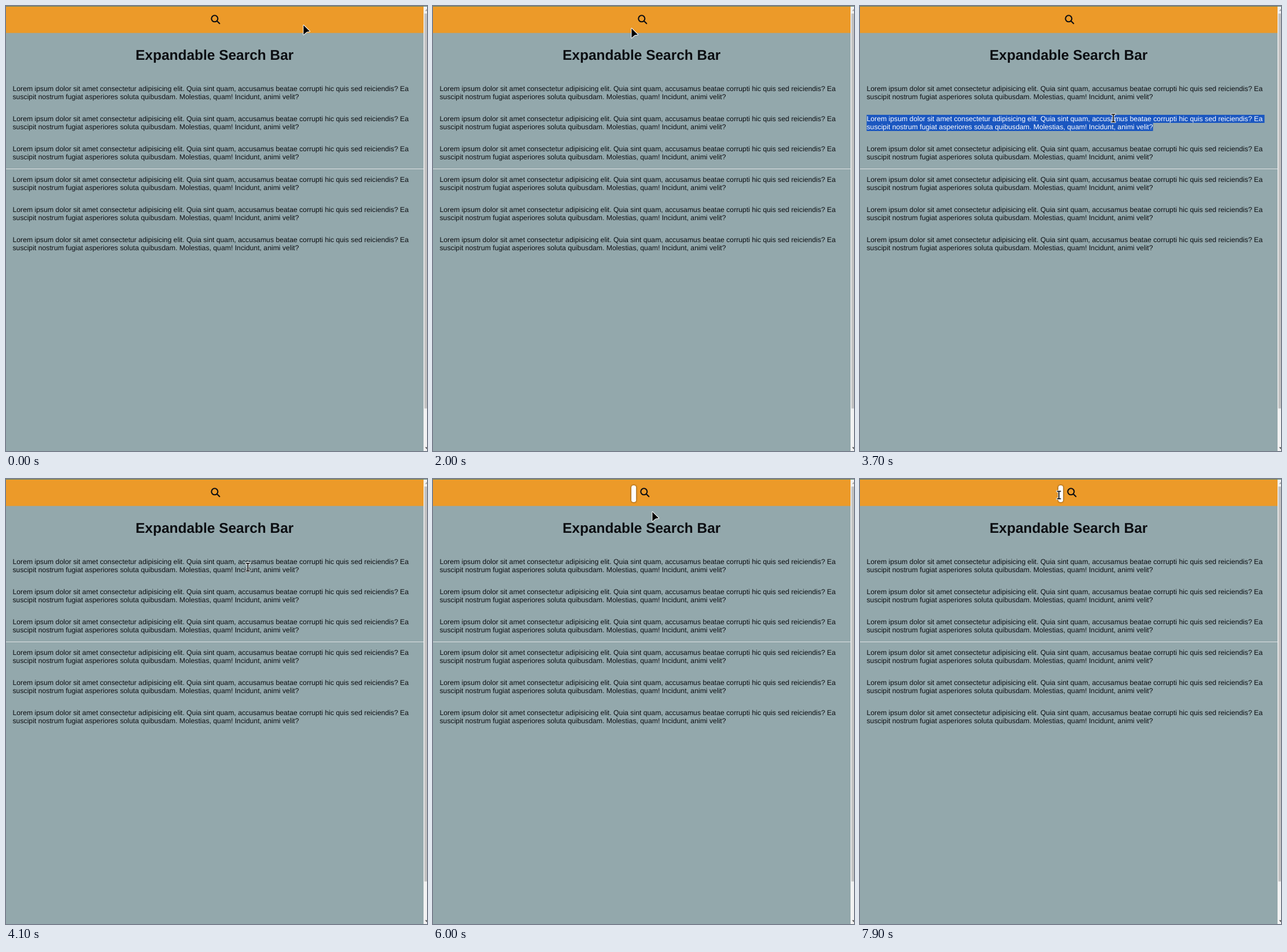
An HTML page for the animation above (8000 ms loop, 728 by 769 pixels).

```html
<!DOCTYPE html>
<html lang="en">
<head>
<meta charset="utf-8">
<title>Expandable Search Bar</title>
<style>
  html, body { margin: 0; width: 100%; height: 100%; overflow: hidden; background: #93a8ac; }
  svg { display: block; width: 728px; height: 769px; }
  text { font: 12.24px "Liberation Sans", Arial, sans-serif; fill: #0c0e12; text-rendering: geometricPrecision; }
  .title { font-size: 24.48px; font-weight: bold; }
  #field { filter: drop-shadow(.4px .8px 1.8px rgba(0, 0, 0, .75)); }
  .pointer path { paint-order: stroke; stroke: #fff; stroke-width: 2; stroke-linejoin: round; }
</style>
</head>
<body>
<svg viewBox="0 0 728 769">
  <rect width="728" height="769" fill="#93a8ac"/>
  <rect width="722" height="46.6" fill="#ec9a29"/>
  <rect y="281" width="722" height="1" fill="#dfe3e4"/>

  <g id="scrollbar">
    <rect x="722" width="6" height="769" fill="#f1f1f1"/>
    <rect x="723.5" y="13" width="4.5" height="682.5" fill="#c1c1c1"/>
    <path d="M724.5 8.5L728 5V8.5Z" fill="#a3a3a3"/>
    <path d="M724.5 762.5H728V766Z" fill="#505050"/>
  </g>
  <rect width="728" height="1" fill="#5c8474"/>

  <rect id="field" x="343" y="11" width="8.2" height="29" rx="3.8" fill="#fff"/>
  <g id="icon" fill="none" stroke-width="2.1" stroke-linecap="round">
    <circle cx="6.5" cy="6.5" r="5.5"/>
    <path d="M10.6 10.6L15 15"/>
  </g>

  <text class="title" x="360.7" y="93" text-anchor="middle">Expandable Search Bar</text>
  <g fill="#1b57c0">
    <rect id="word" x="401.3" y="188" width="61.9" height="14"/>
    <path id="block" d="M11.5 188H699.5V202H506.7V216H11.5Z"/>
  </g>
  <g id="copy"></g>

  <g class="pointer">
    <path id="arrow" d="M.5 1.2L11.2 11.8L6 12.7L.5 17.4Z"/>
    <path id="hand" d="M-1.5 1.2Q0 -.2 1.5 1.2V5.8L7 7.2Q8.5 7.8 8.3 9.5L7.5 13.5V15.8H-.5L-4.3 10Q-4.8 8.3 -3 8.4L-1.5 9.6Z"/>
    <path id="beam" d="M-3.5 -6.4H3.5V-5H.8V6.6H3.5V8H-3.5V6.6H-.8V-5H-3.5Z"/>
  </g>
</svg>
<script>
const LOOP = 8000, STEP = 100;
const INK = "#0c0e12", HOVER = "#1f4f50";
const OPEN_AT = 5300;
const $ = id => document.getElementById(id);

const line1 = ["Lorem ipsum dolor sit amet consectetur adipisicing elit. Quia sint quam, ",
  "accusamus", " beatae corrupti hic quis sed reiciendis? Ea"];
const line2 = "suscipit nostrum fugiat asperiores soluta quibusdam. Molestias, quam! Incidunt, animi velit?";

$("copy").innerHTML = Array.from({ length: 6 }, (_, i) => {
  const y = 147 + 52 * i + (i > 2 ? 1 : 0);
  return `<g><text x="11.5" y="${y}">${line1.map(s => `<tspan>${s}</tspan>`).join("")}</text>` +
    `<text x="11.5" y="${y + 14}">${line2}</text></g>`;
}).join("");
const picked = $("copy").children[1];
const pickedWord = picked.querySelectorAll("tspan")[1];

// Each move glides from the previous resting point.
const home = { x: 514, y: 32 };
const move = (from, to, x, y) => ({ from, to, x, y });
const moves = [
  move(0, 700, 357, 16), move(700, 900, 356, 21), move(1400, 1700, 367, 21),
  move(1900, 2200, 274, 85), move(2200, 2400, 375, 32),
  move(2900, 3000, 278, 241), move(3000, 3300, 438, 193),
  move(3800, 4700, 362, 33), move(4700, 4900, 361, 30),
  move(5900, 6200, 430, 129), move(6200, 6600, 210, 94), move(6600, 6800, 183, 127),
  move(6800, 7700, 348, 34), move(7800, 7900, 344, 27)
];

const ease = p => p * p * (3 - 2 * p);
const progress = (t, m) => Math.min(1, Math.max(0, (t - m.from) / (m.to - m.from)));

function pointerAt(t) {
  return moves.reduce((at, m) => {
    const p = ease(progress(t, m));
    return { x: at.x + (m.x - at.x) * p, y: at.y + (m.y - at.y) * p };
  }, home);
}

const inBox = (p, x0, y0, x1, y1) => p.x >= x0 && p.x <= x1 && p.y >= y0 && p.y <= y1;
const overIcon = p => inBox(p, 352, 14, 374, 31);
const overField = p => inBox(p, 342, 11, 352, 40);
const overCopy = p => p.y > 136 && (p.y - 136) % 52 < 28;

const show = (id, on) => $(id).setAttribute("visibility", on ? "visible" : "hidden");

function draw(time) {
  const t = Math.floor(time % LOOP / STEP) * STEP;
  const open = t >= OPEN_AT;
  const word = t >= 3500 && t < 3700, block = t >= 3700 && t < 3900;
  const p = pointerAt(t);
  const hover = overIcon(p);
  const shape = hover ? "hand" : overCopy(p) || open && overField(p) ? "beam" : "arrow";

  show("field", open);
  $("icon").setAttribute("transform", `translate(${open ? 358.3 : 354.3} 15.3)`);
  $("icon").setAttribute("stroke", hover ? HOVER : INK);

  show("word", word);
  show("block", block);
  for (const el of picked.children) el.style.fill = block ? "#fff" : INK;
  pickedWord.style.fill = word || block ? "#fff" : INK;

  for (const id of ["arrow", "hand", "beam"]) show(id, id === shape);
  $(shape).setAttribute("transform", `translate(${p.x.toFixed(1)} ${p.y.toFixed(1)})`);
}

const start = performance.now();
function tick() {
  draw(performance.now() - start);
  requestAnimationFrame(tick);
}
tick();
</script>
</body>
</html>
```
